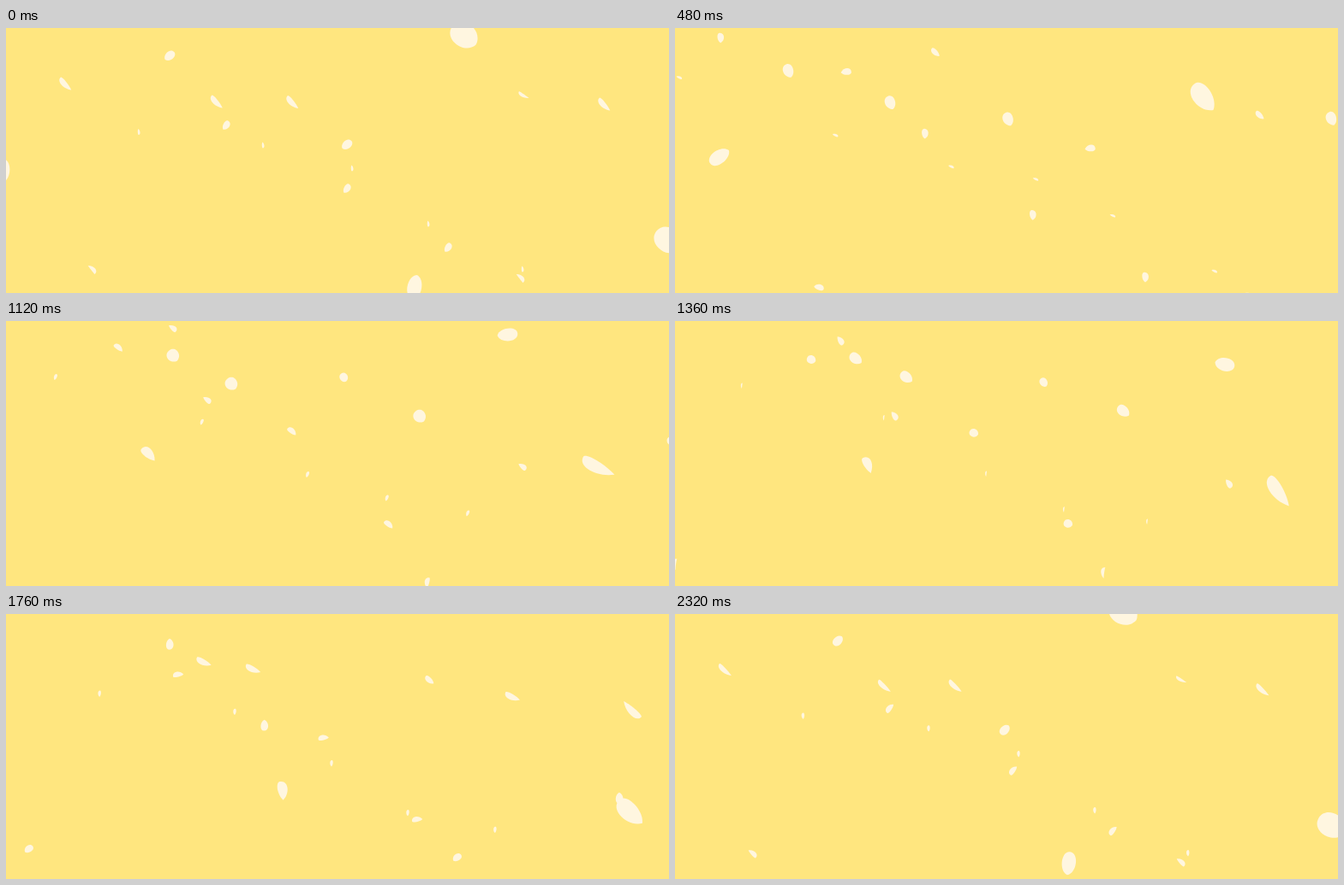
Animation of 774 by 310 pixels, one loop 2.4 s. Source, as an HTML page with a canvas:

```html
<!DOCTYPE html>
<html lang="en">
<head>
<meta charset="utf-8">
<title>Drifting petals</title>
<style>
html, body { margin: 0; width: 100%; height: 100%; overflow: hidden; background: #ffe67f; }
canvas { display: block; }
</style>
</head>
<body>
<canvas id="stage" width="774" height="310"></canvas>
<script>
const ctx = document.getElementById('stage').getContext('2d');
const LOOP = 2400, STEP = 80, GAP = 800;
const TAU = Math.PI * 2;
const mix = (a, b, u) => a + (b - a) * u;

// A stream is one long flight; a petal follows each loop behind the last.
// first, path: key points every GAP ms, starting at first * GAP
// len, wid: size seen [edge-on, face-on]; cup: belly when edge-on
// opens, peak: how often the petal faces the viewer per loop, and when
// angle, turn, swing, beat, phase: direction of the tip in degrees
const streams = [
  { // tiny
    first: 0,
    path: [[-34, 66], [31, 57], [97, 86], [155, 121.5], [208, 123.5], [258, 112],
      [300, 137], [337, 175.5], [373.5, 177], [404, 164], [432.5, 190], [463, 230],
      [493, 229], [524, 217], [563, 245], [603, 282], [648, 283]],
    len: [6.5, 8], wid: [1.5, 5], cup: .7, opens: 2, peak: .85,
    angle: 230, turn: -180, swing: 35
  },
  { // small
    first: 0,
    path: [[-8, 10], [93, 17], [185, 60], [257, 114], [313, 126.5], [362.5, 137],
      [398, 188], [431.5, 234], [471.5, 238], [516, 257], [572, 318]],
    len: [14, 10.5], wid: [3, 10], cup: -2.5, opens: 2, peak: .1,
    angle: 120, turn: -180
  },
  { // low pair
    first: 1, copies: [[0, 0], [500, 10]],
    path: [[-18, 312], [13, 277], [101, 282], [215, 320]],
    len: [13, 11], wid: [4, 9], cup: 2.5, opens: 2, peak: .31,
    angle: 165, swing: 68, phase: .03
  },
  { // middle, long stream
    first: 2,
    path: [[-50, 50], [69, 66], [168, 40.5], [224, 50], [245.5, 87], [256, 82.5],
      [280, 62.5], [334, 87.5], [433, 114.5], [564, 100], [698, 90], [810, 120]],
    len: [20, 15], wid: [5, 15], cup: 2, opens: 1, peak: .38,
    angle: 50, swing: 22, phase: .25
  },
  { // middle, half turn per loop
    first: 1,
    path: [[197, -12], [192, 33], [191, 32.5], [213, 69], [282, 125], [398, 136.5],
      [544.5, 149], [689, 207], [820, 240]],
    len: [11, 14], wid: [6, 10], cup: 1.5, opens: 1, peak: .93,
    angle: 140, turn: 180
  },
  { // middle, upper right
    first: 0,
    path: [[240, -15], [348, 52.5], [468, 76], [604, 79], [732, 121.5], [840, 170]],
    len: [14, 11], wid: [3.5, 9.5], cup: 1.5, opens: 1, peak: .47,
    angle: 47, swing: 14, phase: .45
  },
  { // large, left
    first: 0,
    path: [[-4, 167], [99, 147], [284, 188], [477, 302.5], [620, 390]],
    len: [20, 28], wid: [10, 17], cup: -2, opens: 1, peak: .07,
    angle: 300, turn: 180, swing: 20, phase: .55
  },
  { // largest
    first: 2,
    path: [[430, -80], [535, 8.5], [664, 129], [718, 222], [773, 248.5], [850, 245]],
    len: [42, 35], wid: [14, 28], cup: 3, opens: 1, peak: -.02,
    angle: 40, swing: 25, beat: 2, phase: .125
  },
  { // large, right
    first: 1,
    path: [[510, -30], [696, 87], [860, 220]],
    len: [28, 23], wid: [8, 16], cup: -2.5, opens: 2, peak: .53,
    angle: 90, turn: 180
  },
  { // passing the corner
    first: 2,
    path: [[720, -70], [815, 40]],
    len: [40, 40], wid: [14, 14], cup: 0, opens: 1, peak: .37,
    angle: 120
  }
];

function poseAt({ len, wid, cup, opens, peak, angle, turn = 0, swing = 0, beat = 1, phase = 0 }, u) {
  const open = .5 + .5 * Math.cos(TAU * opens * (u - peak));
  return {
    len: mix(...len, open),
    wid: mix(...wid, open),
    bend: cup * (1 - open),
    round: mix(.1, .8, open),
    angle: angle + turn * u + swing * Math.cos(TAU * beat * (u - phase))
  };
}

// Smooth curve through evenly timed points
function pointAt(path, pos) {
  const i = Math.min(Math.floor(pos), path.length - 2), u = pos - i;
  const a = path[i], b = path[i + 1], before = path[i - 1], after = path[i + 2];
  return [0, 1].map(k => {
    const rise = b[k] - a[k];
    const m0 = before ? (b[k] - before[k]) / 2 : rise;
    const m1 = after ? (after[k] - a[k]) / 2 : rise;
    return a[k] + u * (m0 + u * (3 * rise - 2 * m0 - m1 + u * (m0 + m1 - 2 * rise)));
  });
}

function drawPetal(x, y, { len, wid, bend, round, angle }) {
  const h = len / 2, c = len * (.05 + .45 * round);
  const s1 = (bend + wid / 2) / .75, s2 = (bend - wid / 2) / .75;
  ctx.save();
  ctx.translate(x, y);
  ctx.rotate(angle * TAU / 360);
  ctx.translate(0, -bend * .8);
  ctx.beginPath();
  ctx.moveTo(h, 0);
  ctx.bezierCurveTo(c, s1, -h, s1, -h, 0);
  ctx.bezierCurveTo(-h, s2, c, s2, h, 0);
  ctx.fill();
  ctx.restore();
}

function draw(t) {
  ctx.fillStyle = '#ffe67f';
  ctx.fillRect(0, 0, 774, 310);
  ctx.fillStyle = '#fff6e0';
  for (const stream of streams) {
    const { first, path, copies = [[0, 0]] } = stream;
    const pose = poseAt(stream, t / LOOP);
    for (let pos = t / GAP - first; pos <= path.length - 1; pos += LOOP / GAP) {
      if (pos < 0) continue;
      const [x, y] = pointAt(path, pos);
      for (const [dx, dy] of copies) drawPetal(x + dx, y + dy, pose);
    }
  }
}

const start = performance.now();
function tick() {
  const t = (performance.now() - start) % LOOP;
  draw(Math.floor(t / STEP) * STEP);
  requestAnimationFrame(tick);
}
tick();
</script>
</body>
</html>
```
